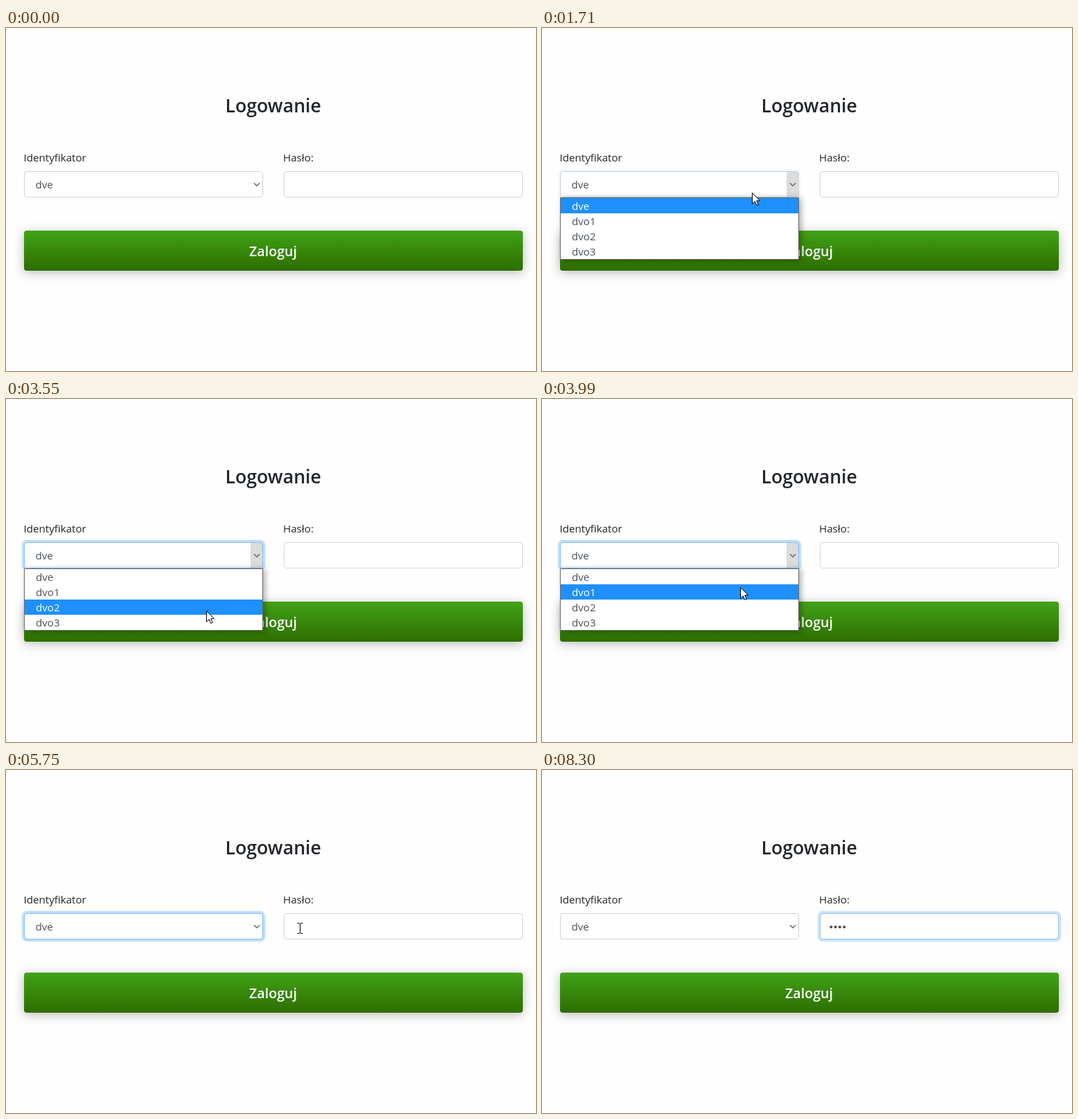
Animation of 765 by 496 pixels, one loop 8330 ms. Source, as an HTML page:

```html
<!DOCTYPE html>
<html lang="pl">
<head>
<meta charset="utf-8">
<title>Logowanie</title>
<style>
  html, body { margin: 0; width: 100%; height: 100%; overflow: hidden; background: #fefefe; }
  svg { display: block; width: 765px; height: 496px; }
  text { font: 15.15px "Open Sans", "Noto Sans", sans-serif; fill: #212529; white-space: pre; }
  .title { font-size: 26.7px; font-weight: 600; text-anchor: middle; }
  .send { font-size: 19.6px; font-weight: 600; text-anchor: middle; fill: #fff; }
  .value { fill: #495057; }
  .box { fill: #fff; stroke: #ced4da; }
  #ring { fill: none; stroke: #80bdff; }
  .glow { stroke: #bfdeff; stroke-width: 3.2; }
  .button { filter: drop-shadow(0 3px 8px #0004); }
  #popup { filter: drop-shadow(3px 1px 4px #0005); }
  #cursor path { stroke: #000; fill: #fff; stroke-linejoin: round; }
</style>
</head>
<body>
<svg viewBox="0 0 765 496">
  <defs>
    <linearGradient id="green" x2="0" y2="1">
      <stop stop-color="#41a317"/><stop offset="1" stop-color="#2e6d00"/>
    </linearGradient>
    <rect id="field" x="26.5" y="207.5" width="344" height="37" rx="3.5"/>
    <g id="ring">
      <rect class="glow" x="24.4" y="205.4" width="348.2" height="41.2" rx="5.6"/>
      <use href="#field"/>
    </g>
  </defs>
  <text class="title" x="385.7" y="122">Logowanie</text>
  <text x="25.5" y="193">Identyfikator</text>
  <text x="400" y="193">Hasło:</text>

  <use class="box" href="#field"/>
  <rect id="hover" x="353" y="208" width="17.5" height="36" fill="#dcdcdc"/>
  <path d="M358 224.3l4 4 4-4" fill="none" stroke="#666" stroke-width="1.5"/>
  <text class="value" x="42.5" y="232">dve</text>
  <use id="ringLeft" href="#ring"/>

  <use class="box" href="#field" x="375"/>
  <use id="ringRight" href="#ring" x="375"/>
  <g id="dots" fill="#495057"></g>
  <rect id="caret" y="215" width="1" height="21" fill="#333"/>

  <rect class="button" x="26" y="293" width="720" height="58" rx="4" fill="url(#green)"/>
  <text class="send" x="385.5" y="330">Zaloguj</text>

  <g id="popup">
    <rect x="26.5" y="245.5" width="344" height="89" fill="#fff" stroke="#6b6b6b"/>
    <rect id="mark" x="27" width="343" height="22" fill="#1e90ff"/>
  </g>

  <g id="cursor">
    <path id="arrow" d="M.5 .5V16.2L4.2 12.7L6.7 18.4L9.2 17.3L6.7 11.8H11.5Z"/>
    <path id="hand" d="M-1 8V1.7a1.5 1.5 0 0 1 3 0V7c2-1 3 0 3 .7 2-.6 2.7.2 2.8 1 1.8-.3 2.5.3 2.5 1.8v3.5c0 2.5-1.8 4-1.8 6.5h-8c0-2-3.5-5.5-4.5-8.5-.6-2 1.5-2.4 3-.5z"/>
    <path id="beam" d="M-3.5-7.5H-1L.5-6.5 2-7.5H4.5M.5-6.5V6.5M-3.5 7.5H-1L.5 6.5 2 7.5H4.5" style="fill:none"/>
  </g>
</svg>
<script>
const LOOP = 8330, ROW = 22, TOP = 246, FOCUS = 5870;
const $ = id => document.getElementById(id);
const show = (el, on) => el.style.display = on ? "" : "none";
const add = (parent, tag, attrs) => {
  const el = document.createElementNS("http://www.w3.org/2000/svg", tag);
  for (const key in attrs) el.setAttribute(key, attrs[key]);
  return parent.appendChild(el);
};

const options = ["dve", "dvo1", "dvo2", "dvo3"].map((name, i) => {
  const el = add($("popup"), "text", { x: 43, y: 263 + i * ROW });
  el.textContent = name;
  return el;
});
const typed = [6270, 6380, 6490, 6700];
const dots = typed.map((_, i) => add($("dots"), "circle", { cx: 417.3 + 6.3 * i, cy: 227, r: 2.1 }));

// Pointer moves: start, end, where to
const moves = [
  [450, 1400, 303, 238],   // to the select
  [2200, 2520, 300, 283],  // down the options
  [2670, 3060, 290, 315],
  [3520, 3780, 286, 275],  // and back up
  [3930, 4310, 287, 264],
  [5150, 5900, 430, 228],  // to the password
  [6980, 7370, 412, 306],  // to the button
  [7620, 7940, 417, 520]   // out of view
];

const ramp = (t, from, to = from + 150) => Math.max(0, Math.min(1, (t - from) / (to - from)));
const easeOut = k => k * (2 - k);

function pointer(t) {
  let x = 410, y = 500;
  for (const [from, to, toX, toY] of moves) {
    const k = easeOut(ramp(t, from, to));
    x += (toX - x) * k;
    y += (toY - y) * k;
  }
  return [Math.round(x), Math.round(y)];
}

function draw(t) {
  const [x, y] = pointer(t);
  const open = t >= 1680 && t < 4520;
  const inField = x > 400 && y > 206 && y < 246;
  const onButton = !open && y >= 293 && y < 351;
  $("cursor").setAttribute("transform", `translate(${x} ${y})`);
  show($("beam"), inField);
  show($("hand"), onButton);
  show($("arrow"), !inField && !onButton);

  const row = Math.max(0, Math.floor((y - TOP) / ROW));
  show($("popup"), open);
  $("mark").setAttribute("y", TOP + row * ROW);
  options.forEach((el, i) => el.style.fill = i === row ? "#fff" : "#495057");

  show($("hover"), t >= 1290 && t < 5180);
  $("ringLeft").style.opacity = ramp(t, 1690) - ramp(t, FOCUS);
  $("ringRight").style.opacity = ramp(t, FOCUS) - .2 * ramp(t, 8190, 8300);

  const count = typed.filter(time => time <= t).length;
  dots.forEach((el, i) => show(el, i < count));
  const since = t - (count ? typed[count - 1] : FOCUS);
  show($("caret"), since >= 0 && since % 1020 < 510);
  $("caret").setAttribute("x", 414 + Math.round(6.4 * count));
}

const start = performance.now();
(function tick() {
  draw((performance.now() - start) % LOOP);
  requestAnimationFrame(tick);
})();
</script>
</body>
</html>
```
